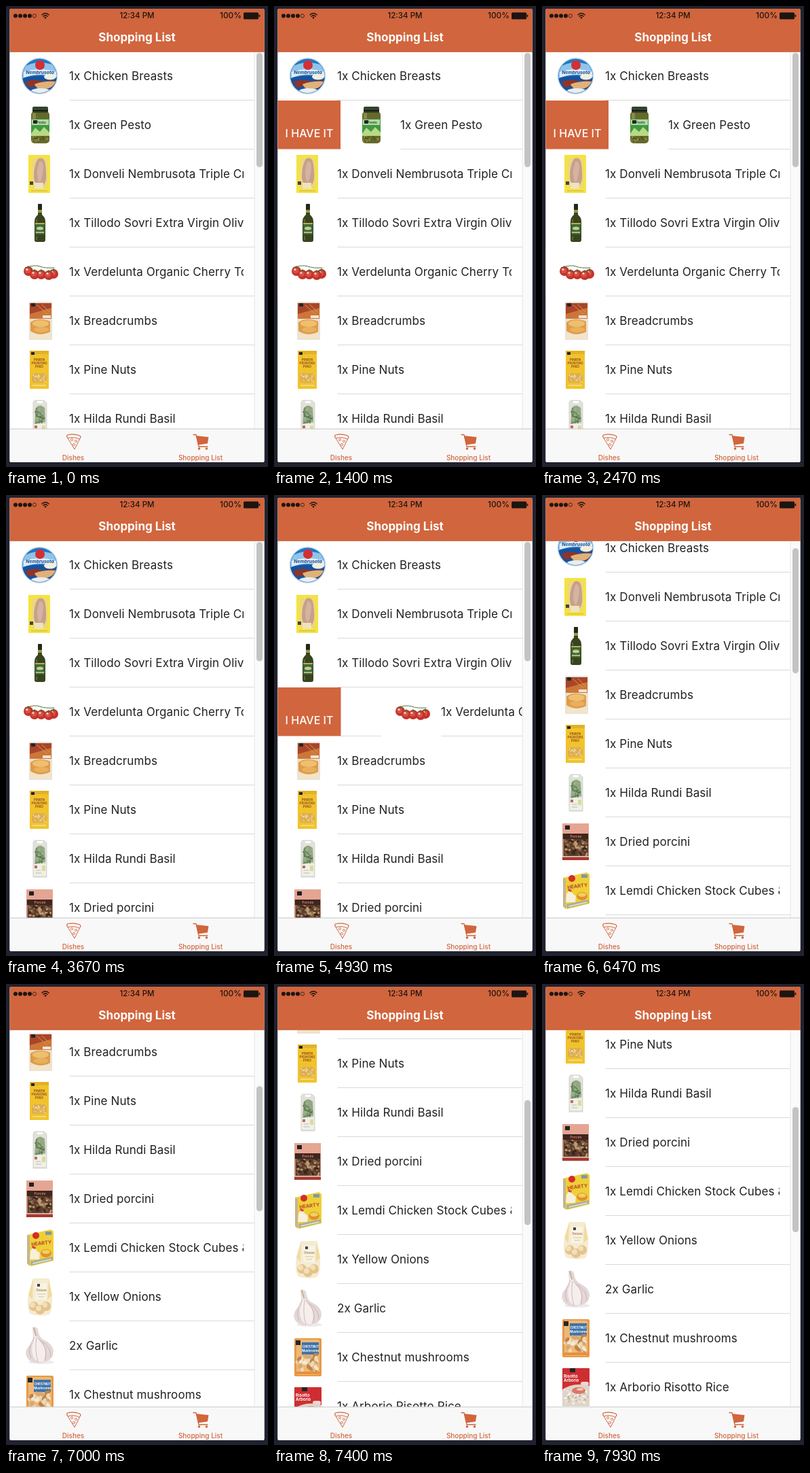
An HTML page that plays this animation: 386x678 px, repeating every 8 s.

```html
<!DOCTYPE html>
<html lang="en">
<head>
<meta charset="utf-8">
<title>Shopping List</title>
<style>
html, body { margin: 0; width: 100%; height: 100%; overflow: hidden; background: #20222f; }
svg { display: block; width: 100%; height: 100%; font-family: Inter, Roboto, sans-serif; }
.name { font-size: 17px; letter-spacing: .1px; fill: #222; }
.mini { text-anchor: middle; font-weight: 700; }
.bar { text-anchor: middle; font-weight: 500; }
</style>
</head>
<body>
<svg id="stage" viewBox="0 0 386 678"></svg>
<script>
const DURATION = 8000, ROW = 72, TOP = 68, ORANGE = '#d1653d', INK = '#1c1512';

const rect = (x, y, w, h, fill, extra = '') =>
  `<rect x="${x}" y="${y}" width="${w}" height="${h}" fill="${fill}" ${extra}/>`;
const oval = (x, y, rx, ry, fill, extra = '') =>
  `<ellipse cx="${x}" cy="${y}" rx="${rx}" ry="${ry}" fill="${fill}" ${extra}/>`;
const dot = (x, y, r, fill, extra) => oval(x, y, r, r, fill, extra);
const path = (d, fill, extra = '') => `<path d="${d}" fill="${fill}" ${extra}/>`;
const line = (d, color, width = 1) =>
  path(d, 'none', `stroke="${color}" stroke-width="${width}" stroke-linecap="round" stroke-linejoin="round"`);
const label = (x, y, size, fill, text, extra = '') =>
  `<text class="mini" x="${x}" y="${y}" font-size="${size}" fill="${fill}" ${extra}>${text}</text>`;
const barText = (x, y, size, fill, text, extra = '') =>
  `<text class="bar" x="${x}" y="${y}" font-size="${size}" fill="${fill}" ${extra}>${text}</text>`;

function randomizer(seed) {
  return () => (seed = (seed * 16807) % 2147483647) / 2147483647;
}

// Small ovals spread over a box centred on (x, y).
function scatter(seed, count, x, y, w, h, size, colors) {
  const rnd = randomizer(seed);
  let out = '';
  for (let i = 0; i < count; i++) {
    const cx = x + (rnd() - .5) * w, cy = y + (rnd() - .5) * h;
    const spin = `transform="rotate(${rnd() * 180} ${cx} ${cy})"`;
    out += oval(cx, cy, size * (.7 + rnd() * .6), size * .6, colors[i % colors.length], spin);
  }
  return out;
}

// Product pictures, drawn around their centre.
const art = {
  tub: () => dot(-.5, 0, 27, '#cfdcea') + dot(-.5, 0, 25.5, '#2078c4') +
    '<g clip-path="url(#disc)">' +
    path('M-27-11Q-6-27 27-14V3Q0-7-27 4Z', '#8fc4ea') +
    path('M-24-6Q0-14 25-6V1Q0-6-24 2Z', '#deedf8') +
    path('M-27 4Q-6-4 27 3V27H-27Z', '#17529f') +
    oval(15, 1, 9, 4.5, '#f1efdf') +
    path('M-22 9Q-8 3 4 8L22 6L17 18Q2 12-16 17Z', '#8f3427') +
    path('M-8 12Q6 7 23 8Q19 20 0 20Q-6 17-8 12Z', '#dfb27a') +
    oval(1, 22, 14, 4, '#e9eef2') + '</g>' +
    dot(0, -16, 7, '#d32f35') + label(0, -3.5, 6.8, '#174a8e', 'Nembrusota', 'font-style="italic"'),

  jar: () => rect(-13, -20, 27, 47, '#66692c', 'rx="5"') + rect(-11, -18, 5, 42, '#8b8a48', 'rx="2"') +
    rect(-11, -27, 23, 9, '#35432b', 'rx="2"') + rect(-11, -22, 23, 2, '#171d17') +
    rect(-13, -9, 27, 25, '#3f9a42') + rect(-12, -8, 25, 8, '#b9d6a4') + rect(-10, -7, 6, 5, '#222') +
    label(2, -2, 5, '#1d5c35', 'Pesto') + path('M-13 13L-7 4L0 10L6 3L14 11V16H-13Z', '#b8d986') +
    scatter(5, 24, 0, 21, 22, 8, 1.6, ['#8d8b3b', '#4d541f']),

  ham: () => rect(-17, -28, 32, 56, '#f5e244', 'rx="1"') + rect(-12, -23, 23, 44, '#ecd87c', 'rx="5"') +
    path('M-3-22Q3-26 7-19Q10-6 9 8Q7 19 0 18Q-9 16-9 3Q-9-13-3-22Z', '#c6a08d') +
    path('M-1-18Q4-20 5-12Q5 2 0 13Q-5 6-4-5Z', '#d5b3a1') +
    rect(-15, 11, 5, 5, '#444') + rect(-8, 13, 13, 9, '#efe3bd') + rect(-13, 24, 24, 1.5, '#d9c23c'),

  bottle: () => rect(-3, -28, 6, 10, '#23281b', 'rx="1"') +
    path('M-3-20H3V-12Q8-8 8-2V25Q8 28 5 28H-5Q-8 28-8 25V-2Q-8-8-3-12Z', '#38441f') +
    rect(-3, -19, 6, 4, '#9d9846') + rect(-7, 0, 14, 17, '#3a6a35') + rect(-7, 0, 14, 2, '#b9ac58') +
    oval(0, 8, 5, 2.5, '#c9c795') + rect(-6, 13, 12, 2, '#b8b683') + line('M-5-5V-1M-5 20V25', '#7d8a52'),

  tomatoes: () => line('M-22-6Q-8-11 0-8T21-6', '#557337') +
    [[-17, -2], [20, 2], [-8, 3], [2, 3], [13, 4]].map(([x, y]) =>
      dot(x, y + 1, 7, '#c4332c') + dot(x - 1, y, 4, '#d95145') + dot(x - 2, y - 1.5, 1.6, '#f6d3ca') +
      line(`M${x} ${y - 6}l-3 2m3-2l3 2m-3-2v3`, '#4d6b33')).join(''),

  crumbs: () => rect(-16, -28, 34, 56, '#ece2d3', 'rx="1.5"') + rect(-15, -26, 32, 22, '#a8452b') +
    path('M-15-10L17-19V-3H-15Z', '#cd7638') + rect(-13, -26, 6, 5, '#252525') +
    line('M-4-23L11-10M3-24L14-13', '#d9984a') + path('M-14 2Q-2-6 15 1V16Q0 24-14 15Z', '#df9c48') +
    oval(1, 4, 12, 5, '#efbf70') + oval(2, 13, 11, 4, '#e8b05d') + rect(-14, 20, 30, 6, '#f3e5c8') +
    rect(4, -8, 12, 4, '#f1e5d2'),

  nuts: () => rect(-15, -28, 28, 56, '#f0c32c', 'rx="1"') + rect(-15, -28, 28, 5, '#e3b125') +
    rect(-13, -26, 5, 4, '#222') + label(-1, -13, 5, '#9a5522', 'PINIEN') +
    label(-1, -8, 5, '#9a5522', 'PIGNONS') + label(-1, -3, 5, '#9a5522', 'PINO') +
    rect(-12, 5, 22, 14, '#dfae4d', 'rx="4"') +
    scatter(9, 60, -1, 12, 18, 11, 1.2, ['#f3dfa4', '#d6a75a']) + rect(-11, 22, 20, 2, '#f6d873'),

  basil: () => path('M-8-27H6L10-23V27H-10V-24Z', '#e0e2da', 'stroke="#c5c8c0" stroke-width=".7"') +
    rect(-4, -26, 8, 3, '#fff') + path('M-6-16Q0-23 7-16L8 5L-8 8Z', '#93a684') +
    scatter(17, 46, 0, -5, 12, 22, 1.8, ['#55754c', '#9cb38b', '#6f8c61']) +
    rect(-9, 8, 18, 17, '#f0f0e7') + rect(-8, 10, 4, 4, '#c2685f') + rect(3, 10, 5, 8, '#d8dc9a') +
    line('M-6 17H1M-6 21H2', '#bbb'),

  porcini: () => rect(-20, -27, 39, 54, '#c08e76', 'rx="1"') + rect(-20, -27, 39, 15, '#e5a593') +
    rect(-16, -24, 7, 6, '#242020') + rect(-19, -12, 37, 8, '#3b2620') + label(0, -6, 5, '#d9745c', 'Porcini') +
    rect(-18, -4, 36, 25, '#5a3c2a') +
    scatter(23, 75, 0, 9, 32, 22, 2.6, ['#8a6448', '#38251b', '#bd9a72', '#65432e']) +
    rect(-20, 22, 39, 5, '#a8382e') + rect(-20, 21, 39, 1.5, '#e8d5c8'),

  cubes: () => path('M-19-19L16-27L20-24V19L-13 27L-19 23Z', '#efcf38') + path('M-19-19L-15-17V27L-19 23Z', '#c5b68e') +
    rect(8, -24, 9, 5, '#7d9aa6') + dot(-6, -18, 5, '#d42d28') +
    label(3, -4, 7.2, '#b6452a', 'HEARTY', 'transform="rotate(-7)"') +
    path('M-14 5Q-10-4-5 4L0 8L-1 17H-15Z', '#f6f0dc') + path('M-12 0l2-4 2 3 2-1-1 4Z', '#d44434') +
    oval(9, 8, 8, 6, '#e0902e') + oval(9, 6, 6, 3, '#f2d05d') +
    path('M-14 20L19 13V18L-13 26Z', '#a9ae9c') + line('M-10 23L16 17', '#e8e4d4', 1.5),

  onions: () => path('M-10-27H13L18-2Q19 18 14 26Q0 30-15 25Q-20 12-17-3Z', '#f5ebd2') +
    path('M-10-27L-17-3L-11 4ZM13-27L18-2L11 4Z', '#f1dc9f') + rect(-7, -20, 17, 24, '#f8f3e3') +
    rect(-4, -19, 4, 4, '#444') + label(2, -8, 4.5, '#a68961', 'Onions') + line('M-4-4H8M-2 0H6', '#d8c295') +
    [[-9, 14], [9, 14], [0, 19]].map(([x, y]) => dot(x, y, 7, '#e5c38c') + dot(x - 2, y - 2, 4, '#f2dfb8')).join(''),

  garlic: () => oval(2, 24, 19, 3, '#eeeaea') +
    path('M-11-27Q-5-29-3-24Q-2-12 7-8Q20-2 20 9Q19 22 5 24Q-8 28-17 20Q-25 10-16 0Q-9-6-10-15Z', '#e3d8d7') +
    path('M-9-24Q-3-10 1-5Q12 6 5 23Q-5 25-9 18Q-15 3-9-6Z', '#f5eeed') +
    line('M-8-13Q-20 5-13 18M-5-12Q-8 8-3 23M-3-11Q13 1 8 21M2-7Q17 2 16 16', '#c6aab2', .8) +
    line('M-9-26L-6-15', '#c4b395', 2),

  mushrooms: () => rect(-20, -28, 40, 56, '#e59a48', 'rx="2"') + rect(-17, -26, 34, 52, '#efb873', 'rx="2"') +
    rect(-9, -22, 25, 18, '#3f73a8') + rect(-18, -25, 7, 7, '#272727') +
    label(4, -14, 4.4, '#fff', 'CHESTNUT') + label(4, -8, 4.4, '#fff', 'Mushrooms') +
    scatter(41, 30, 0, 9, 27, 22, 4.2, ['#ecd8b8', '#bb8450', '#f4e8d2', '#d7a873']) +
    rect(-17, 21, 34, 4, '#e98f3a'),

  rice: () => rect(-20, -28, 40, 56, '#ce2e32', 'rx="1"') + rect(-9, -28, 8, 6, '#272323') +
    label(-18, -14, 6, '#fff', 'Risotto', 'style="text-anchor:start"') +
    label(-18, -8, 6, '#fff', 'Arborio', 'style="text-anchor:start"') +
    rect(7, -8, 12, 6, '#f4d4cd', 'rx="3"') + path('M-20 4Q-5-8 20-2V28H-20Z', '#dfd4c8') +
    scatter(31, 60, 0, 13, 34, 23, 1.9, ['#fff8ec', '#c3b3a2', '#eee5d8']) +
    oval(4, 5, 10, 5, '#d8776b') + oval(6, 3, 5, 2, '#f4c3ad')
};

const products = [
  ['1x Chicken Breasts', 'tub'],
  ['1x Green Pesto', 'jar'],
  ['1x Donveli Nembrusota Triple Cream', 'ham'],
  ['1x Tillodo Sovri Extra Virgin Olive Oil', 'bottle'],
  ['1x Verdelunta Organic Cherry Tomatoes', 'tomatoes'],
  ['1x Breadcrumbs', 'crumbs'],
  ['1x Pine Nuts', 'nuts'],
  ['1x Hilda Rundi Basil', 'basil'],
  ['1x Dried porcini', 'porcini'],
  ['1x Lemdi Chicken Stock Cubes &amp; Herbs', 'cubes'],
  ['1x Yellow Onions', 'onions'],
  ['2x Garlic', 'garlic'],
  ['1x Chestnut mushrooms', 'mushrooms'],
  ['1x Arborio Risotto Rice', 'rice']
];

// Swipes by row: steps of [time, offset], and the time the row disappears.
const swipes = {
  1: { steps: [[750, 0], [1200, 93]], gone: 2500 },
  4: { steps: [[4480, 0], [4930, 153], [5050, 153], [5250, 93]], gone: 5750 }
};

const rowMarkup = ([name, picture], i) => `<g id="row${i}">` +
  (swipes[i]
    ? rect(5, -36, 361, 72, '#fff') + rect(98, 35, 142, 1, '#dedede') + rect(5, -36, 93.5, 71.5, ORANGE) +
      barText(52, 18, 16, '#fff', 'I HAVE IT')
    : '') +
  `<g id="face${i}">${rect(5, -36, 361, 72, '#fff')}${rect(93.5, 35, 273, 1, '#d9d9d9')}` +
  `<g transform="translate(50)">${art[picture]()}</g>` +
  `<g clip-path="url(#words)"><text class="name" x="93" y="6">${name}</text></g></g></g>`;

const statusBar =
  [14, 21, 28, 35].map(x => dot(x, 14.5, 3, INK)).join('') +
  dot(42, 14.5, 2.6, 'none', `stroke="${INK}" stroke-width=".8"`) +
  line('M53 13Q58 8.5 63 13M55 15.3Q58 12.5 61 15.3', INK, 1.5) + dot(58, 17.3, 1.3, INK) +
  barText(193, 18, 11.5, INK, '12:34 PM') +
  barText(331, 18, 11.8, INK, '100%') +
  rect(350, 9.5, 22, 10, INK, 'rx="1.5"') + rect(372.5, 12.5, 1.8, 4, INK, 'rx="1"');

const pizza = line('M90 634L101 652L109.5 635M91.5 635.5Q100 633 108 637', ORANGE) +
  line('M90 634Q89 630.5 92 630.5Q100 629 107.5 631.5Q110.5 632.5 109.5 635', ORANGE, 1.2) +
  [[97, 638], [103, 640], [100, 645]].map(([x, y]) =>
    dot(x, y, 1.6, 'none', `stroke="${ORANGE}" stroke-width=".8"`)).join('');

const cart = line('M276 630.5H280L284 648H297', ORANGE, 1.3) +
  path('M280 632L298.5 634L297 643.5L283 645.5Z', ORANGE) +
  dot(284.5, 651, 1.8, ORANGE) + dot(295.5, 651, 1.8, ORANGE);

const byId = id => document.getElementById(id);

byId('stage').innerHTML = `<defs>
  <clipPath id="phone">${rect(5.5, 4, 375, 667, '#000', 'rx="2"')}</clipPath>
  <clipPath id="view">${rect(5, TOP, 361, 554, '#000')}</clipPath>
  <clipPath id="words">${rect(93, -36, 257, 72, '#000')}</clipPath>
  <clipPath id="disc">${dot(-.5, 0, 25, '#000')}</clipPath>
</defs>` + rect(0, 0, 386, 678, '#20222f') +
  '<g clip-path="url(#phone)">' + rect(5, 4, 376, 667, '#fff') +
  `<g clip-path="url(#view)">${products.map(rowMarkup).join('')}</g>` +
  rect(366, TOP, 15, 554, '#fafafa') + rect(365.5, TOP, 1, 554, '#e6e6e6') +
  rect(369, 69, 9, 168, '#c3c3c3', 'id="thumb" rx="4.5"') +
  rect(5, 4, 376, 64, ORANGE) + rect(5, 67, 376, 1, '#c9795a') + statusBar +
  barText(193, 52, 17, '#fff', 'Shopping List', 'style="font-weight:700"') +
  rect(5, 622, 376, 49, '#f8f8f8') + rect(5, 621.5, 376, 1, '#c8c8c8') +
  pizza + cart + barText(99, 667.5, 10, ORANGE, 'Dishes') +
  barText(286.5, 667.5, 10, ORANGE, 'Shopping List') + '</g>';

function tween(steps, t) {
  if (t <= steps[0][0]) return steps[0][1];
  for (let i = 1; i < steps.length; i++) {
    const [t0, a] = steps[i - 1], [t1, b] = steps[i];
    if (t < t1) {
      const p = (t - t0) / (t1 - t0);
      return a + (b - a) * p * p * (3 - 2 * p);
    }
  }
  return steps[steps.length - 1][1];
}

// A short drag, then a fling that dies away exponentially.
function scrollAt(t) {
  if (t < 6370) return 0;
  if (t < 6470) return 24.4 * ((t - 6370) / 100) ** 2;
  return 24.4 + 292 * (1 - Math.exp((6470 - t) / 483));
}

function draw(t) {
  const scroll = Math.round(scrollAt(t));
  let slot = 0;
  products.forEach((_, i) => {
    const swipe = swipes[i], row = byId('row' + i);
    const gone = swipe && t >= swipe.gone;
    row.setAttribute('visibility', gone ? 'hidden' : 'visible');
    if (gone) return;
    row.setAttribute('transform', `translate(0 ${103 + ROW * slot++ - scroll})`);
    if (swipe) byId('face' + i).setAttribute('transform', `translate(${tween(swipe.steps, t)})`);
  });
  const removed = products.length - slot;
  byId('thumb').setAttribute('y', 69 + scroll * .371);
  byId('thumb').setAttribute('height', [168, 175.5, 184][removed]);
}

const start = performance.now();
function tick() {
  draw((performance.now() - start) % DURATION);
  requestAnimationFrame(tick);
}
tick();
</script>
</body>
</html>
```
